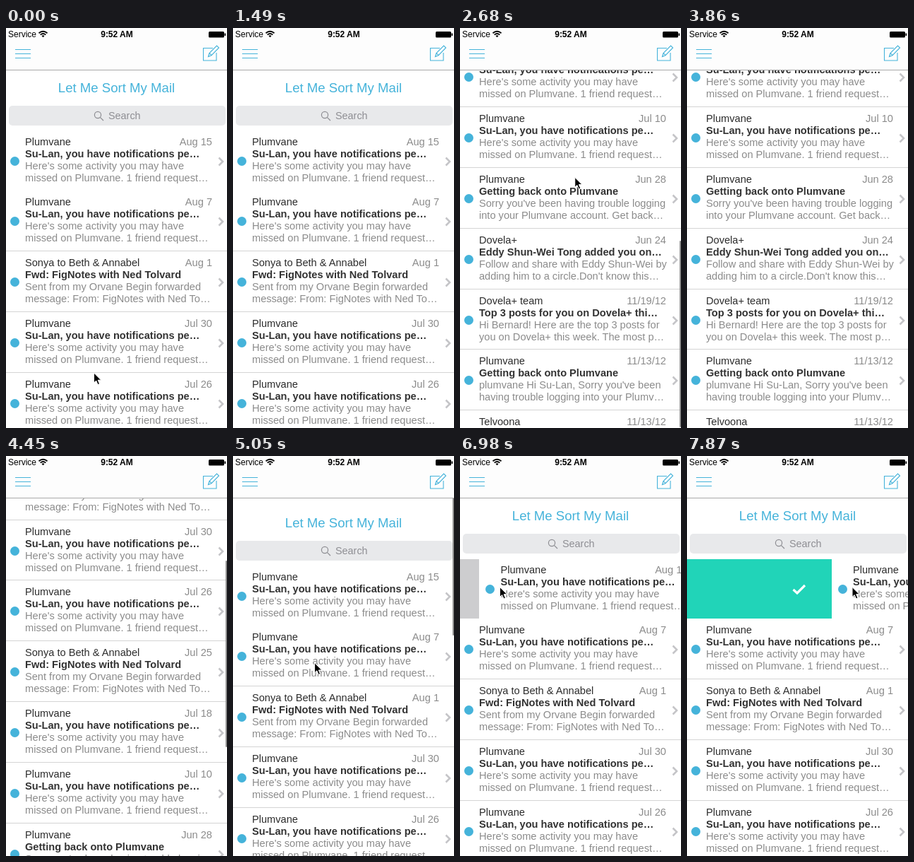
An HTML page that plays this animation: 313x566 px, repeating every 8000 ms.

```html
<!DOCTYPE html>
<html lang="en">
<head>
<meta charset="utf-8">
<title>Inbox</title>
<style>
  html, body { margin: 0; width: 100%; height: 100%; overflow: hidden; background: #fff; }
  #stage { position: relative; width: 313px; height: 566px; overflow: hidden; background: #cdcdcf;
    font: 14.6px/17px "Liberation Sans", Arial, sans-serif; color: #8b8b8b; white-space: nowrap; }
  #stage div, #stage svg { position: absolute; }
  #head { top: 0; width: 313px; height: 700px; background: #fff; }
  #title { top: 74px; width: 313px; text-align: center; font-size: 18.6px; line-height: 22px; color: #45b3da; }
  #search { left: 4px; top: 110px; width: 307px; height: 28px; border-radius: 5px; background: #e8e9eb; }
  #search svg { left: 0; top: 0; }
  #search span { position: absolute; left: 141px; top: 6px; font-size: 14.4px; color: #8e8e93; }
  #list { left: 0; top: 0; }
  .row { left: 0; width: 313px; height: 86px; background: #fff; }
  .row.lined::before { content: ""; position: absolute; top: -1px; width: 100%; height: 1px; background: #d4d4d4; }
  .cell { left: 0; top: 0; width: 313px; height: 85px; }
  .sender { left: 27px; top: 7px; line-height: 18px; color: #2c2c2c; }
  .date { right: 21px; top: 7px; line-height: 18px; }
  .subject { left: 27px; top: 25px; font-weight: bold; color: #333; }
  .text { left: 27px; top: 42px; white-space: pre; }
  .dot { left: 6px; top: 37px; width: 13px; height: 13px; border-radius: 50%; background: #45b3da; }
  .arrow { left: 300px; top: 37px; fill: none; stroke: #c5c5c8; stroke-width: 2.6; }
  #bar { left: 0; top: 1px; height: 84px; overflow: hidden; }
  #check { top: 35px; fill: none; stroke: #fff; stroke-width: 3.2; }
  #thumb { left: 311px; width: 2px; border-radius: 1px; background: #8c8c8c; }
  #nav { left: 0; top: 0; width: 313px; height: 59px; background: #fdfdfd; border-bottom: 1px solid #a9a9a9; color: #000; }
  #nav div { top: 1px; font-size: 12px; }
  #nav svg { left: 0; top: 0; fill: none; }
  #cursor { left: 0; top: 0; overflow: visible; stroke: #fff; }
</style>
</head>
<body>
<div id="stage">
  <div id="head">
    <div id="title">Let Me Sort My Mail</div>
    <div id="search">
      <svg width="150" height="28" fill="none" stroke="#8e8e93" stroke-width="1.2"><circle cx="126" cy="13" r="4.6"/><path d="M129.3 16.3L134 21"/></svg>
      <span>Search</span>
    </div>
  </div>
  <div id="list"></div>
  <div id="thumb"></div>
  <div id="nav">
    <div style="left:3px">Service</div>
    <div style="width:314px;text-align:center;font-weight:bold">9:52 AM</div>
    <svg width="313" height="59">
      <path stroke="#000" stroke-width="1.8" d="M46.5 7.2Q52.5 2.3 58.5 7.2M48.7 9.6Q52.5 6.4 56.3 9.6"/>
      <path fill="#000" d="M50.5 11Q52.5 9.4 54.5 11L52.5 13.2Z"/>
      <rect x="287" y="5" width="22" height="8.5" rx="1.5" fill="#000"/><rect x="309.5" y="7.5" width="1.7" height="3.5" fill="#000"/>
      <path stroke="#45b3da" stroke-width="1.1" d="M13 30.5H35M13 36.5H35M13 42.5H35
        M293 28.5H279.5V46H298V35M286.5 40.5L288 35.5L298.5 25L301.5 28L291 38.7ZM288 35.5L291 38.7"/>
    </svg>
  </div>
  <svg id="cursor" width="12" height="18"><path d="M0 0V14L3.2 11.1L5.6 16.6L8 15.5L5.7 10.2H10.2Z"/></svg>
</div>
<script>
const $ = id => document.getElementById(id);

const notice = date => ["Plumvane", date, "Su-Lan, you have notifications pe…",
  "Here's some activity you may have\nmissed on Plumvane. 1 friend request…"];
const forward = date => ["Sonya to Beth &amp; Annabel", date, "Fwd: FigNotes with Ned Tolvard",
  "Sent from my Orvane Begin forwarded\nmessage: From: FigNotes with Ned To…"];

const mails = [
  notice("Aug 15"), notice("Aug 7"), forward("Aug 1"), notice("Jul 30"),
  notice("Jul 26"), forward("Jul 25"), notice("Jul 18"), notice("Jul 10"),
  ["Plumvane", "Jun 28", "Getting back onto Plumvane",
    "Sorry you've been having trouble logging\ninto your Plumvane account. Get back…"],
  ["Dovela+", "Jun 24", "Eddy Shun-Wei Tong added you on…",
    "Follow and share with Eddy Shun-Wei by\nadding him to a circle.Don't know this…"],
  ["Dovela+ team", "11/19/12", "Top 3 posts for you on Dovela+ thi…",
    "Hi Bernard! Here are the top 3 posts for\nyou on Dovela+ this week. The most p…"],
  ["Plumvane", "11/13/12", "Getting back onto Plumvane",
    "plumvane Hi Su-Lan, Sorry you've been\nhaving trouble logging into your Plumv…"],
  ["Telvoona", "11/13/12", "Just for You from Telvoona: Weekl…",
    "bernard4oo, check out the latest videos\nfrom your channel subscriptions for N…"],
  ["Dovela Statistics", "11/8/12", "Get more visitors to your website…",
    "How to get more visitors to your site.\nRun an online ad dovela.test/ads/anal…"]
];

$("list").innerHTML = mails.map(([sender, date, subject, text], i) =>
  `<div class="row${i > 1 ? " lined" : ""}">` +
  (i ? "" : `<div id="bar"><svg id="check" width="20" height="16"><path d="M1.5 8L7 13L18 2"/></svg></div>`) +
  `<div class="cell"><div class="dot"></div><div class="sender">${sender}</div><div class="date">${date}</div>` +
  `<div class="subject">${subject}</div><div class="text">${text}</div>` +
  `<svg class="arrow" width="10" height="14"><path d="M1.5 1.5L7 7L1.5 12.5"/></svg></div></div>`).join("");
const rows = [...document.querySelectorAll(".row")];
const firstCell = rows[0].querySelector(".cell");

const TICK = 148.5, LOOP = 8000;
const VIEW = 566, MAX_SCROLL = 635, THUMB = 264, TRIGGER = 94;
const SWIPE_START = 45, SWIPE_END = 53, SWIPE = 208;

const clamp = (v, lo, hi) => Math.min(hi, Math.max(lo, v));
const progress = (tick, start, end) => clamp((tick - start) / (end - start), 0, 1);
const ease = (tick, start, end) => {
  const p = progress(tick, start, end);
  return p * p * (3 - 2 * p);
};

// Fling down past the end, spring back, fling up past the top, settle.
const scrollAt = tick => 770 * ease(tick, 11, 14) - 137 * ease(tick, 14, 18)
  - 643 * ease(tick, 27, 33) + 10 * ease(tick, 34, 37);

const swipeAt = tick => SWIPE * progress(tick, SWIPE_START - 1, SWIPE_END) ** 1.75;

// Pointer strokes: first and last tick, start point, end point. Hidden in between.
const strokes = [
  [0, 2, [124.5, 488], [124.5, 488]],
  [2, 4, [124.5, 488], [146, 193]],
  [8, 9, [184, 474], [197, 398]],
  [12, 14, [185, 330], [192, 28]],
  [14, 19, [192, 28], [161.5, 219]],
  [24, 25, [152, 418], [161, 503]],
  [33, 41, [128, 325], [75, 187.5]]
];

function cursorAt(tick) {
  if (tick >= SWIPE_START) return [26 + swipeAt(tick), 185.5];
  const stroke = strokes.find(([first, last]) => tick >= first && tick <= last);
  if (!stroke) return null;
  const [first, last, from, to] = stroke;
  const p = 1 - (1 - progress(tick, first, last)) ** 2;
  return from.map((v, i) => v + (to[i] - v) * p);
}

function drawScroll(tick) {
  const scroll = scrollAt(tick);
  $("head").style.top = Math.round(-scroll) + "px";
  rows.forEach((row, i) => row.style.top = Math.round(144.6 + 85.8 * i - scroll) + "px");

  const inside = clamp(scroll, 0, MAX_SCROLL);
  const length = THUMB - Math.abs(scroll - inside);
  const shown = tick >= 12 && tick < 20 || tick >= 28 && tick < 37;
  Object.assign($("thumb").style, {
    top: inside / MAX_SCROLL * (VIEW - length) + "px",
    height: length + "px",
    opacity: shown ? 1 : 0
  });
}

function drawSwipe(tick) {
  const shift = swipeAt(tick), width = Math.max(0, shift - 3);
  firstCell.style.left = shift + "px";
  $("bar").style.width = width + "px";
  $("bar").style.background = width < TRIGGER ? "#cdcdcf" : "#21d4b8";
  $("check").style.left = Math.max(TRIGGER / 2, width - TRIGGER / 2) - 9.5 + "px";
  $("check").style.opacity = Math.min(1, width / TRIGGER);
}

function drawCursor(tick) {
  const point = cursorAt(tick);
  $("cursor").style.display = point ? "" : "none";
  if (point) $("cursor").style.transform = `translate(${point[0]}px, ${point[1]}px)`;
}

function frame() {
  const tick = Math.floor((performance.now() % LOOP + 5) / TICK);
  drawScroll(tick);
  drawSwipe(tick);
  drawCursor(tick);
  requestAnimationFrame(frame);
}
frame();
</script>
</body>
</html>
```
